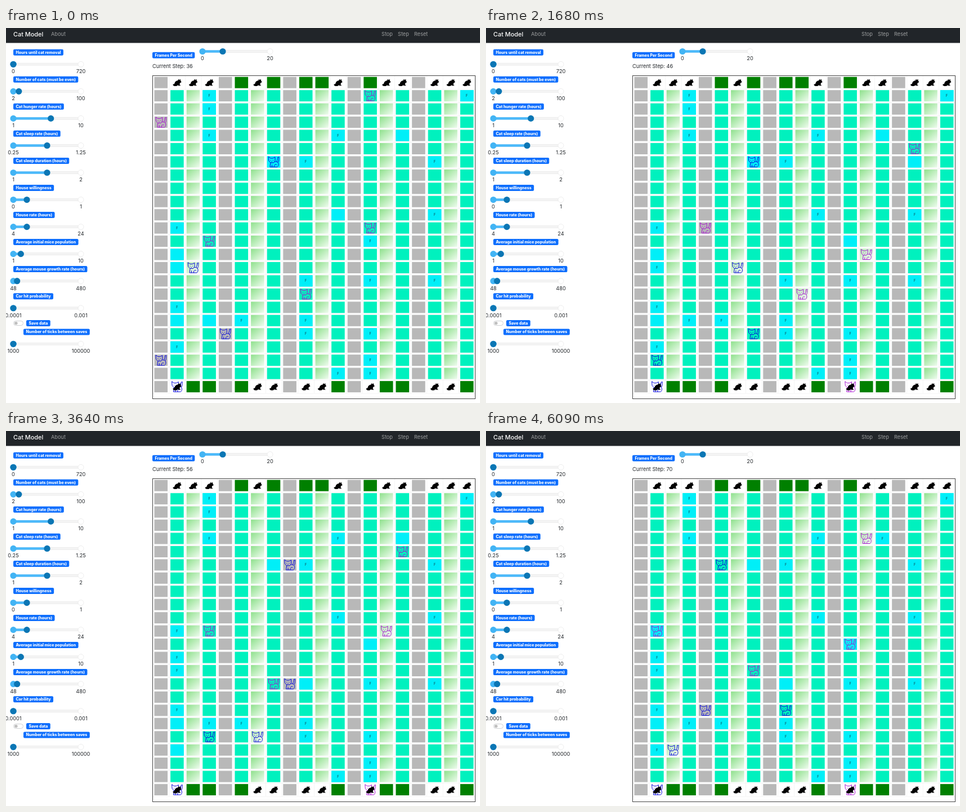
Animation, 842 px wide and 665 px high, one loop 6.16 s. Source, as an HTML page:

```html
<!DOCTYPE html>
<html lang="en">
<head>
<meta charset="utf-8">
<title>Cat Model</title>
<style>
  html, body { margin: 0; width: 100%; height: 100%; overflow: hidden; background: #fff; }
  svg { display: block; width: 842px; height: 665px; font: 9.2px Inter, "Open Sans", sans-serif; fill: #212529; }
  .badge { font-size: 7px; font-weight: 800; fill: #fff; }
  .nav { fill: #9b9d9e; }
  .brand { font-size: 10.9px; font-weight: 500; fill: #fff; }
  .food { font-size: 5.5px; fill: #10303c; }
  .mid { text-anchor: middle; }
</style>
</head>
<body>
<svg id="stage" viewBox="0 0 842 665">
  <defs>
    <linearGradient id="grass" x1="0" y1="0" x2="1" y2="1">
      <stop offset="0" stop-color="#8ee08c"/>
      <stop offset="1" stop-color="#f0fcf0"/>
    </linearGradient>
    <g id="cat" fill="none" stroke-width="1" stroke-linejoin="round" stroke-linecap="round">
      <path d="M-9-9L-5.5-6.5H-1.5L2.5-8.5L2.5-2L0 1.5H-5.5L-8.5-1.5Z"/>
      <path d="M-5.5 1.5L-6.5 9H6.5C9 7 9 3 7.5 1C6-.5 4-.5 2-.5M-3 9V5.5M1 9C0 5.5 3 3.5 5 5"/>
      <path d="M7.5 1C9.5-1 9-3 9.5-8.5L7-8C7.5-5 6-3 5.5-.5"/>
      <path d="M-5.6-2.8h.3M-1.2-2.8h.3M-3.6-.5h.7"/>
    </g>
    <path id="mouse" d="M-7.5 3.5L-4.5 2C-4-2-1-3.5 1.5-3.5L2-6L4-4.8L6-6L6.2-3.6L7.8-.8L5 1L4.5 3.5L6.5 5.5H2L1.5 4.5L-1 6.3H-5L-7 5Z"/>
  </defs>
</svg>
<script>
const LOOP = 6160, TICK = 70, FIRST = 36;
const COLS = 20, ROWS = 24, CELL_W = 28.6, CELL_H = 23.45;
const TEAL = '#00f1be', CYAN = '#00eff8', GRAY = '#b8b8b8', GREEN = '#008000';
const PURPLE = '#a813d2', BLUE = '#0808dc';
const svg = document.getElementById('stage');

function add(tag, attrs, text, parent = svg) {
  const el = document.createElementNS('http://www.w3.org/2000/svg', tag);
  for (const k in attrs) el.setAttribute(k, attrs[k]);
  if (text !== undefined) el.textContent = text;
  parent.appendChild(el);
  return el;
}
const rect = (x, y, width, height, fill, more) => add('rect', { x, y, width, height, fill, ...more });
const dot = (cx, cy, r, fill, more) => add('circle', { cx, cy, r, fill, ...more });
const label = (x, y, text, cls = '') => add('text', { x, y, class: cls }, text);
const show = (el, on) => el.setAttribute('visibility', on ? 'visible' : 'hidden');
const colX = c => 261 + (c + .5) * CELL_W;
const rowY = r => 85 + (r + .5) * CELL_H;

function badge(x, y, text) {
  const box = rect(x, y - 5.5, 0, 11, '#0d6efd', { rx: 2.2 });
  const width = label(x + 4.4, y + 2.5, text, 'badge').getComputedTextLength();
  box.setAttribute('width', width + 8.8);
}

function slider(x, y, lo, value, hi) {
  const at = 120 * (value - lo) / (hi - lo);
  rect(x, y - 2, 120, 4, '#f4f4f4', { rx: 2, stroke: '#e6e6e6', 'stroke-width': .6 });
  dot(x + 120, y, 5, '#fff', { stroke: '#e6e6e6', 'stroke-width': .7 });
  rect(x, y - 2.2, at, 4.4, '#4ab9fb');
  dot(x, y, 5.6, '#42b4f4');
  dot(x + at, y, 5.6, '#0b76b4');
  label(x, y + 15.8, lo, 'mid');
  label(x + 120, y + 15.8, hi, 'mid');
}

// Page
rect(0, 0, 842, 26.5, '#212529');
label(13, 15, 'Cat Model', 'brand');
label(80, 13.7, 'About', 'nav');
['Stop', 'Step', 'Reset'].forEach((s, i) => label(667 + 29 * i, 13.7, s, 'nav'));

[
  ['Hours until cat removal', 0, 0, 720],
  ['Number of cats (must be even)', 2, 10, 100],
  ['Cat hunger rate (hours)', 1, 6, 10],
  ['Cat sleep rate (hours)', .25, .75, 1.25],
  ['Cat sleep duration (hours)', 1, 1.5, 2],
  ['House willingness', 0, .2, 1],
  ['House rate (hours)', 4, 8, 24],
  ['Average initial mice population', 1, 2, 10],
  ['Average mouse growth rate (hours)', 48, 72, 480],
  ['Car hit probability', .0001, .0001, .001],
].forEach(([text, ...range], i) => {
  badge(13, 43.2 + i * 48.05, text);
  slider(13, 64.3 + i * 48.05, ...range);
});
rect(13.5, 519.5, 17, 8, '#fff', { rx: 4, stroke: '#c3c6c9', 'stroke-width': .8 });
dot(17.8, 523.5, 2.8, '#bfbfbf');
badge(36, 523.5, 'Save data');
badge(31, 538.9, 'Number of ticks between saves');
slider(13, 560.3, 1000, 1000, 100000);
badge(260, 48.2, 'Frames Per Second');
slider(349, 41.5, 0, 6, 20);
const counter = label(260, 71, '');

// Grid lines and border
for (let c = 1; c < COLS; c++) rect(261 + c * CELL_W, 85, .6, ROWS * CELL_H, '#eee');
for (let r = 1; r <= ROWS; r++) rect(261, 85 + r * CELL_H, COLS * CELL_W, .6, '#eee');
rect(260.5, 84.5, 573, 573, 'none', { stroke: '#444' });

// Town: M mouse, G bush on the outer rows; roads every fourth column
const EDGE = { 0: '.MMM.GMG.GGM.GMM.MMM', 23: '.MGG.GMM.MMG.MGG.MMG' };
const mice = [];
const cell = (c, r, fill) => rect(colX(c) - 11.8, rowY(r) - 10, 23.6, 20, fill);
const isGrass = (c, r) => c % 4 === 2 && !EDGE[r];

for (let r = 0; r < ROWS; r++) {
  for (let c = 0; c < COLS; c++) {
    if (c % 4 === 0) cell(c, r, GRAY);
    else if (!EDGE[r]) cell(c, r, isGrass(c, r) ? 'url(#grass)' : TEAL);
    else if (EDGE[r][c] === 'G') cell(c, r, GREEN);
    else mice.push([c, r]);
  }
}

// Rows with a food bowl in each column
const bowlRows = {
  1: [11, 13, 14, 17, 18, 20], 3: [1, 2, 4, 18], 5: [18], 7: [6], 9: [6, 15, 18, 19],
  11: [4, 10, 22], 13: [12, 15, 19, 21, 22], 15: [4], 17: [6, 10, 15], 19: [1],
};
// Steps at which a bowl is emptied or refilled, in turn
const bowlTurns = {
  '1,13': [0, 51], '1,14': [0, 43], '1,18': [0], '1,20': [53, 67], '3,18': [0, 40], '7,6': [0],
  '9,15': [48], '11,10': [0, 39], '13,12': [43], '15,4': [0, 61, 66, 68], '17,6': [45, 52],
};
const bowls = Object.entries(bowlRows).flatMap(([c, rows]) => rows.map(r => {
  cell(+c, r, CYAN);
  const key = c + ',' + r;
  return { key, turns: bowlTurns[key] || [], el: label(colX(+c), rowY(r) + 2, 'F', 'food mid') };
}));

// Cats: colour, home cell, then moves [arrival step, columns, rows] at one cell per step
const cats = [
  [PURPLE, 13, 1, [41, 1, -1], [43, -1, -1]],
  [PURPLE, 0, 3, [41, 0, 1], [45, -3, 2], [46, 0, -1], [49, -2, 0], [60, -1, 1], [65, 0, -1], [66, 1, -1], [67, -1, 0]],
  [PURPLE, 13, 11, [43, 0, 1], [46, 1, 1], [50, 1, -1], [56, -1, -1], [58, -1, 0], [64, 0, 1]],
  [PURPLE, 3, 12, [41, 0, -3], [46, 1, 2], [49, 1, 0], [56, -2, 0], [66, -2, 0]],
  [PURPLE, 9, 16, [41, 1, 0], [48, -1, -1], [50, -2, 0], [58, 0, -1]],
  [BLUE, 7, 6, [51, 1, 0], [60, -1, 1], [66, -2, -1]],
  [BLUE, 2, 14, [41, 2, 1], [46, 2, -1], [56, 2, 1], [58, 0, -1], [66, 1, 3]],
  [BLUE, 4, 19, [41, 2, 0], [46, 1, 0], [56, -1, 0], [62, -1, -1], [66, -1, -1]],
  [BLUE, 0, 21, [41, 0, 1], [46, 1, -1], [53, 0, -1], [56, 2, -1], [62, 1, -1], [70, -2, 2]],
  [BLUE, 1, 23],
].map(([stroke, c, r, ...moves]) => {
  const el = add('g', { stroke });
  const pale = add('rect', { x: -11.8, y: -10, width: 23.6, height: 20, fill: '#fff', opacity: .35, stroke: 'none' }, '', el);
  add('use', { href: '#cat' }, '', el);
  return { c, r, moves, el, pale };
});
mice.forEach(([c, r]) => add('use', { href: '#mouse', x: colX(c), y: rowY(r), fill: '#000' }));

// The town wraps round at its edges
function place({ c, r, moves }, step) {
  for (const [end, dc, dr] of moves) {
    const span = Math.max(Math.abs(dc), Math.abs(dr));
    const k = Math.min(1, Math.max(0, 1 - (end - step) / span));
    c += Math.round(dc * k);
    r += Math.round(dr * k);
  }
  return [(c + COLS) % COLS, (r + ROWS) % ROWS];
}

let shown = 0;
function draw(step) {
  if (step === shown) return;
  shown = step;
  counter.textContent = 'Current Step: ' + step;
  const taken = new Set();
  for (const cat of cats) {
    const [c, r] = place(cat, step);
    taken.add(c + ',' + r);
    cat.el.setAttribute('transform', `translate(${colX(c)} ${rowY(r)})`);
    show(cat.pale, isGrass(c, r));
  }
  for (const { key, turns, el } of bowls) {
    const full = turns.filter(s => s <= step).length % 2 === 0;
    show(el, full && !taken.has(key));
  }
}

// A step lasts 2.6 ticks on average
const start = performance.now();
function frame() {
  const tick = Math.floor((performance.now() - start) % LOOP / TICK);
  draw(FIRST + Math.ceil((tick - .42) / 2.6));
  requestAnimationFrame(frame);
}
frame();
</script>
</body>
</html>
```
